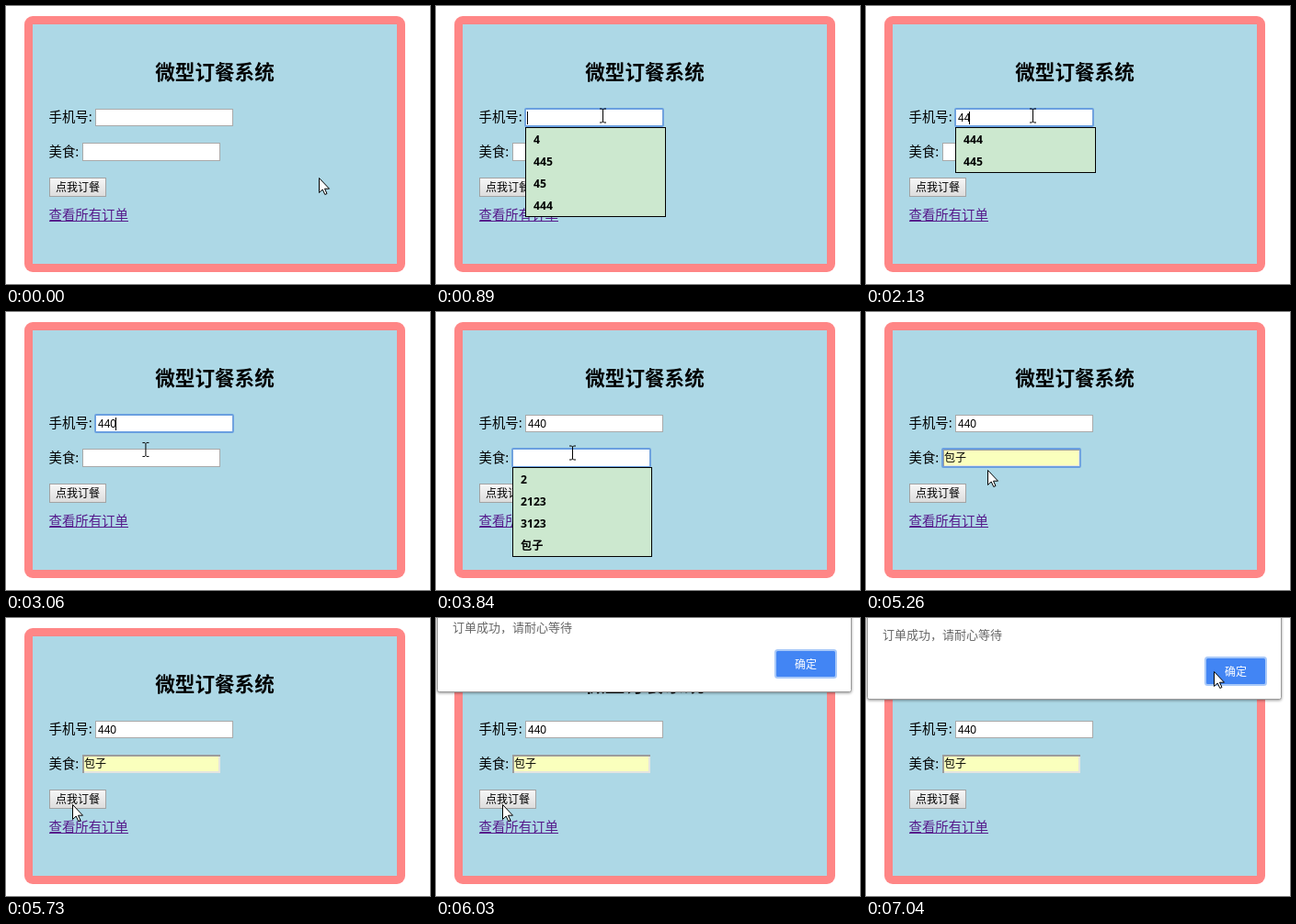
Recreate the animation shown at these times as an HTML page. Size 461 by 303 pixels, loop 8 s.

```html
<!DOCTYPE html>
<html lang="zh-CN">
<head>
<meta charset="utf-8">
<title>微型订餐系统</title>
<style>
html, body { margin: 0; width: 100%; height: 100%; overflow: hidden; background: #fff; }
svg { display: block; width: 461px; height: 303px; }
text { font-family: "Noto Sans CJK SC", "Noto Sans CJK", sans-serif; font-size: 12px; white-space: pre; }
.title { font-size: 21.6px; font-weight: 700; text-anchor: middle; }
.label { font-size: 14.4px; }
.value { font-family: "Liberation Sans", "Noto Sans CJK SC", "Noto Sans CJK", sans-serif; }
.item { font-family: "Open Sans", "Noto Sans CJK SC", "Noto Sans CJK", sans-serif; font-size: 12.2px; font-weight: 700; }
</style>
</head>
<body>
<svg viewBox="0 0 461 303">
  <defs>
    <linearGradient id="face" x2="0" y2="1">
      <stop stop-color="#f7f7f7"/><stop offset="1" stop-color="#dcdcdc"/>
    </linearGradient>
    <filter id="shadow" x="-5%" y="-10%" width="120%" height="125%">
      <feDropShadow dx="0" dy="1" stdDeviation="1.6" flood-opacity=".4"/>
    </filter>
  </defs>
  <rect x="20" y="11" width="414" height="279" rx="9" fill="#ff8686"/>
  <rect x="29" y="20" width="396" height="261" fill="#add8e6"/>
  <text class="title" x="227" y="79.5">微型订餐系统</text>
  <text class="label" x="46.5" y="126">手机号:</text>
  <text class="label" x="46.5" y="163.5">美食:</text>
  <rect x="47.5" y="187.5" width="61" height="20" fill="url(#face)" stroke="#a3a3a3"/>
  <text x="54" y="202">点我订餐</text>
  <text class="label" x="46.5" y="232.5" fill="#551a8b">查看所有订单</text>
  <path d="M47 234.5h86" stroke="#551a8b"/>
  <g transform="translate(40 90)">
    <g id="fields"></g>
    <g id="popup"></g>
  </g>
  <g id="dialog">
    <path d="M1.5-20V86.5q0 2 2 2H449.5q2 0 2-2V-20z" fill="#fff" stroke="#9a9a9a" filter="url(#shadow)"/>
    <text x="18" y="23" fill="#666" style="font-size:13px">订单成功，请耐心等待</text>
    <rect x="369" y="43" width="66" height="30" rx="2.5" fill="#4285f4" stroke="#a9c9f8" stroke-width="2"/>
    <text x="390" y="63" fill="#fff" style="font-weight:500">确定</text>
  </g>
  <path id="arrow" d="M.5.5V16.5L4.2 13 6.8 18.5 9 17.5 6.5 12.2H11.5z" fill="#fff" stroke="#000"/>
  <path id="beam" d="M-3.5-7.5H-1L0-6.5 1-7.5H3.5M0-6.5V6.5M-3.5 7.5H-1L0 6.5 1 7.5H3.5" fill="none" stroke="#000"/>
</svg>
<script>
const LOOP = 8000;
const $ = id => document.getElementById(id);
// Field boxes and popups are relative to this corner
const corner = { x: 40, y: 90 };
const phone = { x: 57, y: 22, w: 150, h: 19 };
const food = { x: 43, y: 59, w: 150, h: 20 };
const dishes = ['2', '2123', '3123', '包子'];

// Pointer moves: start, end, number of steps, destination
const moves = [
  [270, 650, 6, 172, 114],
  [810, 810, 1, 181.5, 119.5],
  [2820, 3140, 5, 148.5, 153.5],
  [4090, 4480, 6, 162, 252],
  [4870, 5100, 4, 128.5, 151.5],
  [5260, 5260, 1, 132, 172],
  [5330, 5570, 4, 72, 203],
  [6510, 6880, 6, 376, 58],
  [7040, 7040, 1, 378, 58]
];

// [time, value] pairs: the latest one reached
const at = (t, keys) => keys.reduce((v, [start, next]) => t >= start ? next : v, keys[0][1]);
const within = (t, a, b) => t >= a && t < b;

function inside(p, b) {
  const x = p.x - corner.x - b.x, y = p.y - corner.y - b.y;
  return within(x, 0, b.w) && within(y, 0, b.h);
}

function pointer(t) {
  let x = 340, y = 187;
  for (const [a, b, n, tx, ty] of moves) {
    if (t < a) break;
    const k = b > a ? Math.floor((t - a) / (b - a) * (n - 1) + 1e-6) : 0;
    const p = Math.min(1, (k + 1) / n), e = p * p * (3 - 2 * p);
    x += (tx - x) * e;
    y += (ty - y) * e;
  }
  return { x, y };
}

function field(b, { value, focus, caret, filled }) {
  const { x, y, w, h } = b;
  let s = `<rect x="${x + .5}" y="${y + .5}" width="${w - 1}" height="${h - 1}" fill="${filled ? '#faffbd' : '#fff'}" stroke="#a9a9a9"/>`;
  if (filled) {
    s += `<path d="M${x + 1} ${y + h - 1}H${x + w - 1}V${y + 1}" fill="none" stroke="#e4e4e0" stroke-width="2"/>
      <path d="M${x + 1} ${y + h}V${y + 1}H${x + w}" fill="none" stroke="#9c9c9c" stroke-width="2"/>`;
  }
  if (focus) s += `<rect x="${x}" y="${y}" width="${w}" height="${h}" rx="1" fill="none" stroke="#6a9fe0" stroke-width="1.8"/>`;
  s += `<text class="value" x="${x + (filled ? 2 : 3)}" y="${y + 14}">${value}</text>`;
  if (caret) {
    const cx = x + 2.5 + Math.round(value.length * 6.67);
    s += `<path d="M${cx} ${y + 3}v14" stroke="#000"/>`;
  }
  return s;
}

function popup(b, items, hover) {
  const x = b.x, y = b.y + b.h + (b === phone ? 1 : 0), w = b === phone ? 153 : 152;
  let s = `<rect x="${x + .5}" y="${y + .5}" width="${w - 1}" height="${items.length * 24 + 1}" fill="#cce8cf" stroke="#000"/>`;
  items.forEach((item, i) => {
    const top = y + 1 + i * 24;
    if (i === hover) s += `<rect x="${x + 1}" y="${top}" width="${w - 2}" height="24" fill="#a5d4db"/>`;
    s += `<text class="item" x="${x + 9}" y="${top + 16.5}">${item}</text>`;
  });
  return s;
}

function draw(t) {
  const p = pointer(t);
  const dishOpen = within(t, 3380, 4650);
  const row = dishOpen && p.y >= 170 ? Math.min(3, Math.floor((p.y - 170) / 24)) : -1;
  const picked = t >= 4650;

  $('fields').innerHTML = field(phone, {
    value: at(t, [[0, ''], [1520, '4'], [2050, '44'], [2590, '440']]),
    focus: within(t, 810, 3290),
    caret: within(t, 810, 1290) || within(t, 1520, 3140)
  }) + field(food, {
    value: picked ? dishes[3] : row >= 0 ? dishes[row] : '',
    focus: within(t, 3290, 5650),
    caret: within(t, 3290, 3840),
    filled: picked || row >= 0
  });

  const numbers = at(t, [
    [0, null],
    [890, ['4', '445', '45', '444']],
    [1520, ['4', '444', '445', '45']],
    [2130, ['444', '445']],
    [2590, null]
  ]);
  $('popup').innerHTML = numbers ? popup(phone, numbers, -1) : dishOpen ? popup(food, dishes, row) : '';

  $('dialog').setAttribute('transform', `translate(0 ${t < 6120 ? -8 : 0})`);
  $('dialog').setAttribute('visibility', t >= 6030 ? 'visible' : 'hidden');

  const beam = inside(p, phone) || inside(p, food);
  for (const id of ['arrow', 'beam']) {
    $(id).setAttribute('transform', `translate(${p.x} ${p.y})`);
    $(id).setAttribute('visibility', (id === 'beam') === beam ? 'visible' : 'hidden');
  }
}

let start;
function tick(now) {
  start ??= now;
  draw((now - start) % LOOP);
  requestAnimationFrame(tick);
}
draw(0);
requestAnimationFrame(tick);
</script>
</body>
</html>
```
